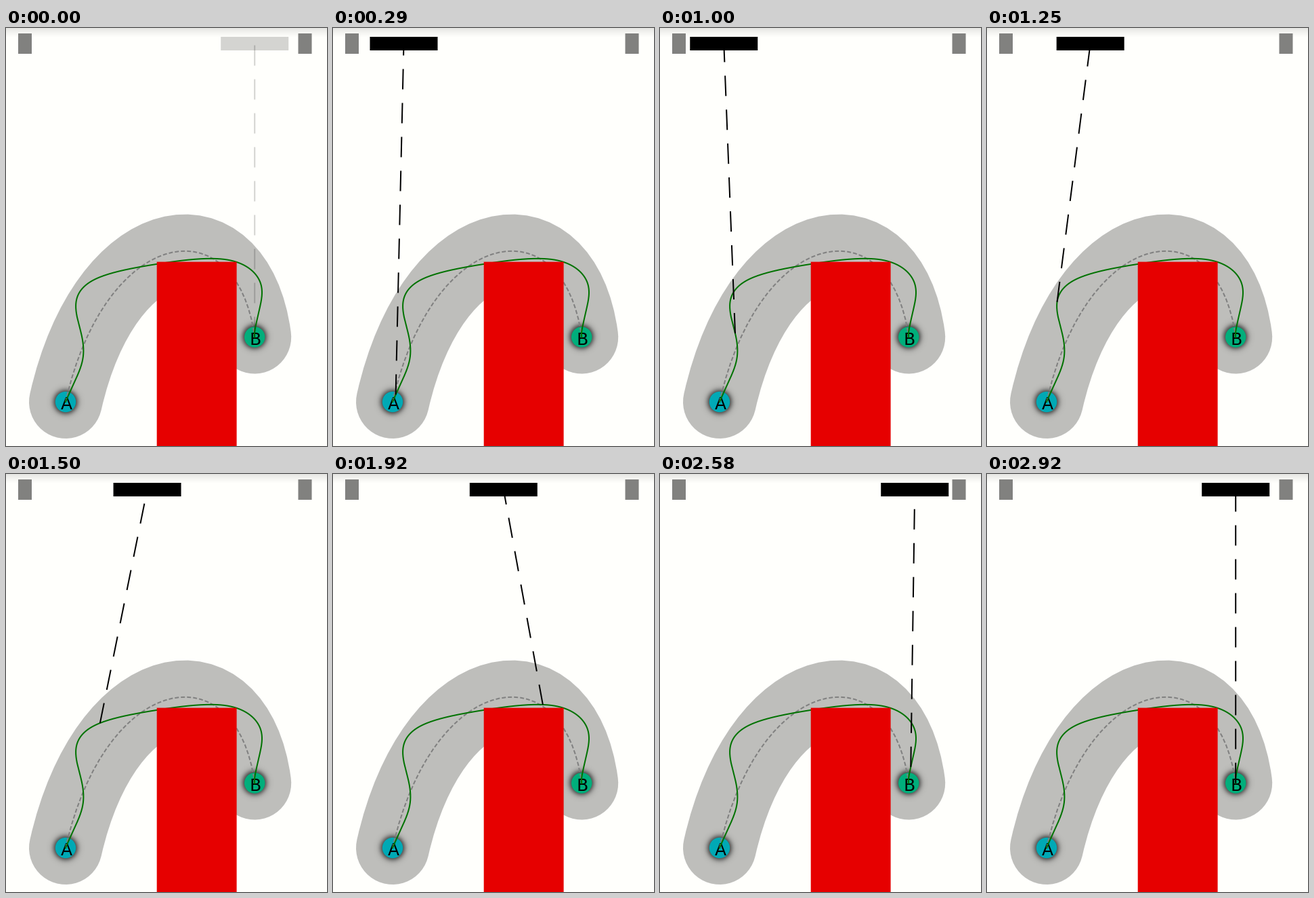
Animation, 474 px wide and 616 px high, one loop 2.96 s. Source, as a matplotlib script:

```python
import numpy as np
import matplotlib.pyplot as plt
from matplotlib.animation import FuncAnimation
from matplotlib.patches import Circle, PathPatch, Rectangle
from matplotlib.path import Path

W, H, DPI = 474, 616, 64
PT = 72 / DPI                       # points per pixel
LOOP, TICK = 2960, 10               # ms
START, SPAN = 40, 240               # first waypoint and spacing, ms
RAIL_Y = 23
GRAVITY = 350                       # px per SPAN squared
A, B = (88, 551), (367.2, 455.5)

# Waypoints of the hanging load, evenly spaced in time
WAY = np.array([A, (92.3, 541), (102.8, 518), (113.5, 487), (111, 450),
                (103.3, 405.5), (133.5, 369.3), (222, 348), (324.5, 341.2),
                (374, 371.5), (375, 411), (367.9, 443), B])
N = len(WAY) - 1

# Natural cubic spline: accelerations at the waypoints
BEND = np.zeros_like(WAY)
BEND[1:-1] = np.linalg.solve(
    4 * np.eye(N - 1) + np.eye(N - 1, k=1) + np.eye(N - 1, k=-1),
    6 * np.diff(WAY, 2, axis=0))


def load(t):
    """Position and acceleration of the load at time t (ms)."""
    s = np.clip((np.atleast_1d(t) - START) / SPAN, 0, N)
    i = np.minimum(s.astype(int), N - 1)
    u = (s - i)[:, None]
    v = 1 - u
    pos = (v * WAY[i] + u * WAY[i + 1]
           - u * v / 6 * ((1 + v) * BEND[i] + (1 + u) * BEND[i + 1]))
    return pos, v * BEND[i] + u * BEND[i + 1]


def crane(t):
    """Load x, y and trolley x: the rope pulls along acceleration minus gravity."""
    ((x, y),), ((ax_, ay_),) = load(t)
    return x, y, x + (y - RAIL_Y) * ax_ / (GRAVITY - ay_)


fig = plt.figure(figsize=(W / DPI, H / DPI), dpi=DPI, facecolor="#fffffc")
ax = fig.add_axes([0, 0, 1, 1])
ax.axis("off")


def box(x, y, w, h, color, z):
    return ax.add_patch(Rectangle((x, y), w, h, fc=color, lw=0, zorder=z,
                                  snap=False))


def shade(alpha, extent, z):
    rgba = np.zeros(alpha.shape + (4,))
    rgba[..., 3] = alpha
    ax.imshow(rgba, extent=extent, origin="lower", aspect="auto",
              interpolation="nearest", zorder=z)


def stop(center, color, label):
    x, y = center
    d = np.arange(-30, 30) + 0.5
    r = np.hypot(*np.meshgrid(d, d))
    shade(0.72 / (1 + np.exp((r - 17.5) / 2.3)), (x - 30, x + 30, y - 30, y + 30), 2)
    ax.add_patch(Circle(center, 15.2, fc=color, lw=0, zorder=3))
    ax.text(x + 1.2, y + 11.3, label, family="DejaVu Sans", size=25 * PT,
            ha="center", va="baseline", zorder=4)


# Page shadow along the top edge
fade = 0.1 * (1 - np.arange(15)[:, None] / 15) ** 1.4
shade(fade, (0, W, 0, 15), 0)

# Corridor around the planned arc
arc = Path([A, (147, 291), (340.5, 259), B], [Path.MOVETO] + [Path.CURVE4] * 3)
ax.add_patch(PathPatch(arc, fill=False, ec="#bebebb", lw=108 * PT,
                       capstyle="round", zorder=1))
stop(A, "#00a9b5", "A")
stop(B, "#00ae7b", "B")
ax.add_patch(PathPatch(arc, fill=False, ec="#808080", lw=2 * PT,
                       ls=(0, (3, 1.5)), capstyle="butt", zorder=5))

track, _ = load(np.linspace(START, START + N * SPAN, 400))
ax.plot(*track.T, color="#007200", lw=2 * PT, zorder=6)

box(222.7, 344.6, 117.9, H - 344.6, "#e60000", 7)
for x in (18, 431.5):
    box(x, 8, 20, 30, "#81817f", 8)

trolley = box(0, RAIL_Y - 10, 100, 20, "black", 9)
rope, = ax.plot([], [], color="black", lw=2 * PT, ls=(0, (15, 10)),
                dash_capstyle="butt", snap=False, zorder=10)

ax.set_xlim(0, W)
ax.set_ylim(H, 0)

# The motion advances 24 times a second, rounded to 10 ms
STEPS = np.floor(np.arange(71) * 25 / 6 + 0.5) * 10


def update(k):
    step = np.searchsorted(STEPS, k * TICK, side="right") - 1
    # The loop opens on the crane fading out at B
    ghost = step == 0
    x, y, cx = crane(LOOP if ghost else STEPS[step])
    trolley.set_x(cx - 50)
    rope.set_data([x, cx], [y, RAIL_Y])
    for part in (trolley, rope):
        part.set_alpha(0.17 if ghost else 1)
    return trolley, rope


anim = FuncAnimation(fig, update, frames=LOOP // TICK, interval=TICK,
                     repeat=True, repeat_delay=0, blit=False)
plt.show()
```
